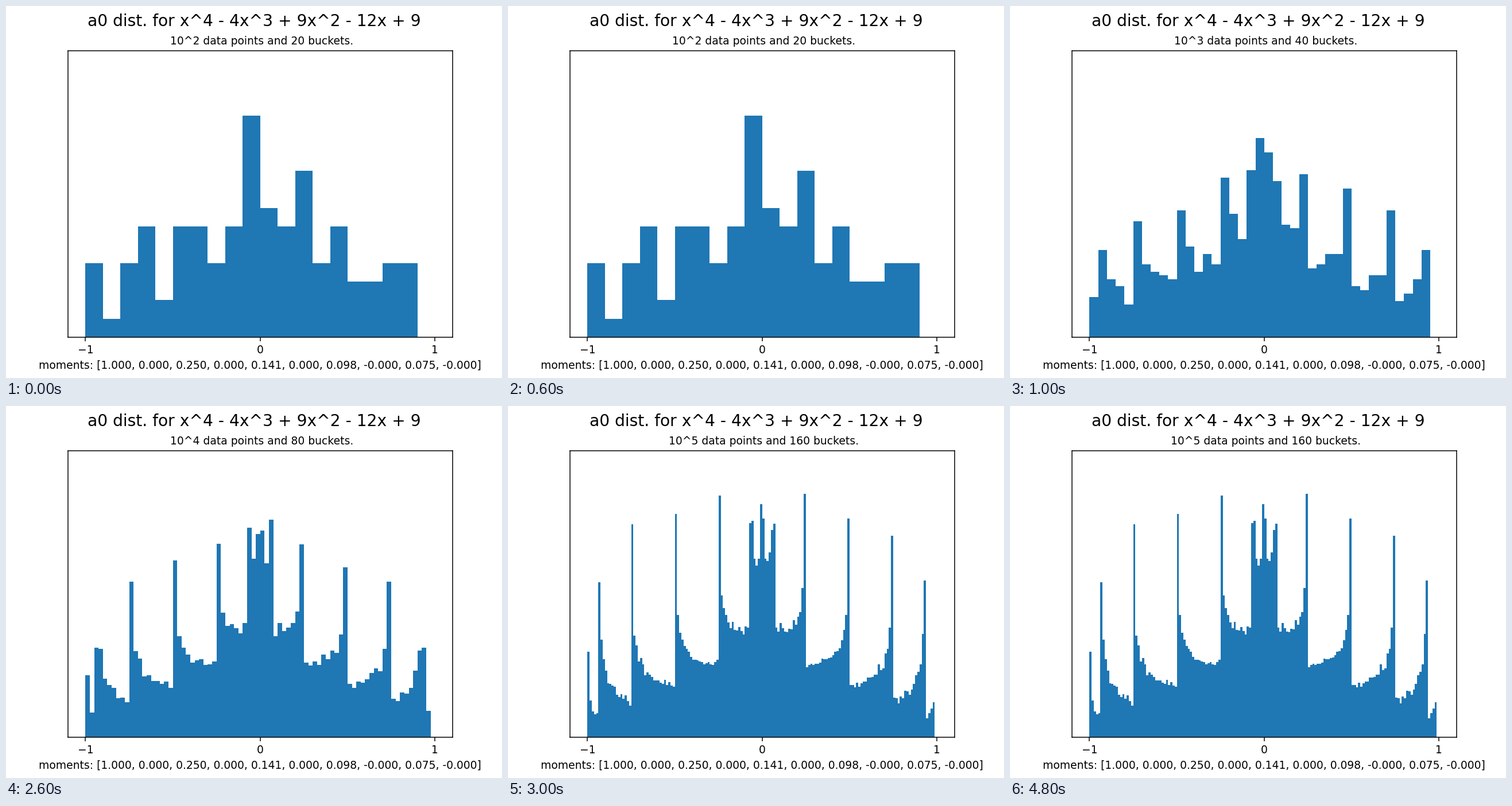
Write a matplotlib script that moves like this. It is 864 px wide and 648 px high and loops after 6 s.

```python
import numpy as np
import matplotlib.pyplot as plt
from matplotlib.animation import FuncAnimation

plt.rcParams["font.family"] = "DejaVu Sans"

POLYNOMIAL = "x^4 - 4x^3 + 9x^2 - 12x + 9"
MOMENTS = "[1.000, 0.000, 0.250, 0.000, 0.141, 0.000, 0.098, -0.000, 0.075, -0.000]"
LAST_STEP = 3

# Over F_3 the polynomial splits into (x^2 - x + 3)(x^2 - 3x + 3),
# so its roots have these two Frobenius angles.
ANGLES = np.arccos(np.array([1, 3]) / (2 * np.sqrt(3)))


def normalized_traces(count):
    """Traces of the first powers of Frobenius, scaled to [-1, 1]."""
    powers = np.arange(1, count + 1)
    return np.cos(np.outer(powers, ANGLES)).mean(axis=1)


fig, ax = plt.subplots(figsize=(6.4, 4.8), dpi=135)
fig.suptitle(f"a0 dist. for {POLYNOMIAL}", fontsize=15)


def draw(frame):
    step = min(frame, LAST_STEP)
    exponent = step + 2
    buckets = 20 * 2**step
    edges = np.linspace(-1, 1, buckets + 1)[:-1]

    ax.clear()
    ax.hist(normalized_traces(10**exponent), bins=edges, density=True,
            color="#1f77b4")
    ax.set_xlim(-1.1, 1.1)
    ax.set_ylim(0, 1.6)
    ax.set_xticks([-1, 0, 1])
    ax.set_yticks([])
    ax.set_title(f" 10^{exponent} data points and {buckets} buckets.", fontsize=10)
    ax.set_xlabel(f"moments: {MOMENTS}")
    return ax.patches


# One step per second; the finest histogram is held for three.
anim = FuncAnimation(fig, draw, frames=6, interval=1000, init_func=lambda: [],
                     repeat=True, repeat_delay=0)
plt.show()
```
